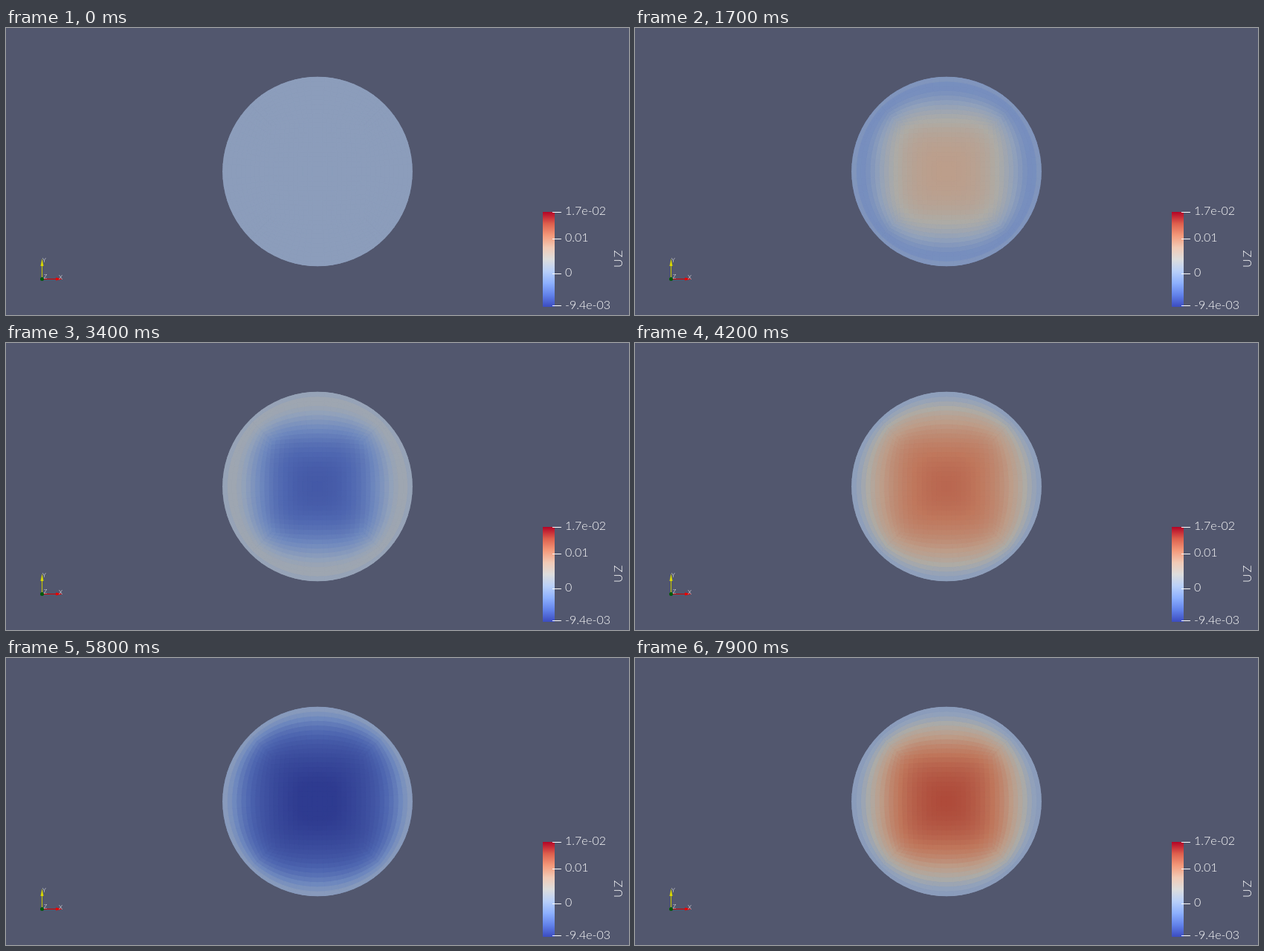
An HTML page with a canvas for the animation above (8 s loop, 838 by 387 pixels).

```html
<!DOCTYPE html>
<html lang="en">
<head>
<meta charset="utf-8">
<title>Vibrating plate</title>
<style>
  html, body { margin: 0; width: 100%; height: 100%; overflow: hidden; background: #52576e; }
  canvas, svg { position: absolute; left: 0; top: 0; width: 838px; height: 387px; }
  text { fill: #fff; font: 300 16px Lato, sans-serif; }
  .axis text { font-size: 8px; }
</style>
</head>
<body>
<canvas id="plate" width="838" height="387"></canvas>
<svg viewBox="0 0 838 387">
  <path d="M735 248.5h12M735 284.5h12M735 331.5h12M735 374.5h12" stroke="#fff"/>
  <text x="752" y="252">1.7e-02</text>
  <text x="752" y="288">0.01</text>
  <text x="752" y="335">0</text>
  <text x="752" y="379">-9.4e-03</text>
  <text transform="translate(829 323) rotate(-90)" letter-spacing="2">UZ</text>
  <g class="axis">
    <path d="M48.5 338V314" stroke="#c8c800"/>
    <path d="M46.5 321l2-10 2 10z" fill="#d8d800"/>
    <path d="M50 338.5H70" stroke="#d00000"/>
    <path d="M67 336.5l9 2-9 2z" fill="#e80000"/>
    <circle cx="48.5" cy="338.5" r="2.5" fill="#005a0a"/>
    <text x="49" y="316">Y</text>
    <text x="50.5" y="338">Z</text>
    <text x="71" y="339">X</text>
  </g>
</svg>
<script>
const ctx = document.getElementById('plate').getContext('2d');
const CX = 419, CY = 193.5, R = 127.8, CORE = 62, N = 20, RINGS = 10;
const LOOP = 8000, STEP = 100, ONSET = 200, RAMP = 400;
const PERIOD = 3415, PEAK = 1120;

// Colour scale from the lowest to the highest deflection (in 1e-4), and its shade on the plate
const LOW = -94, HIGH = 170;
const SCALE = ['#3b4cc0', '#6282ea', '#8db0fe', '#b9d0f9', '#dddddd', '#f1cab6', '#f49a7b', '#de604d', '#b40426'];
const SHADE = [.785, .775, .75];
const RGB = SCALE.map(hex => [1, 3, 5].map(i => parseInt(hex.slice(i, i + 2), 16)));

const clamp = x => Math.max(0, Math.min(1, x));

function tone(value) {
  const place = clamp((value - LOW) / (HIGH - LOW)) * (SCALE.length - 1);
  const i = Math.min(Math.floor(place), SCALE.length - 2), t = place - i;
  return `rgb(${SHADE.map((s, k) => Math.round(s * (RGB[i][k] * (1 - t) + RGB[i + 1][k] * t)))})`;
}

const phase = time => 2 * Math.PI * (time - PEAK) / PERIOD;

// A main mode plus a rim mode a quarter period ahead of it
const mainMode = r => 142 * (1 - r * r) * (1 - (r / .92) ** 8);
const rimMode = r => 210 * r ** 4 * (1 - r * r);

const corePoint = (u, v) => [
  CORE * u * (1 + .06 * (1 - v * v)),
  CORE * v * (1 + .06 * (1 - u * u))
];

function ringPoint(s, depth, side) {
  const [ix, iy] = corePoint(s, 1), angle = s * Math.PI / 4;
  let x = ix + (R * Math.sin(angle) - ix) * depth;
  let y = iy + (R * Math.cos(angle) - iy) * depth;
  for (let k = 0; k < side; k++) [x, y] = [y, -x];
  return [x, y];
}

function polygon(points) {
  const path = new Path2D();
  points.forEach(([x, y]) => path.lineTo(CX + x, CY + y));
  path.closePath();
  return path;
}

// The square mesh core bulges the contours towards its corners
function meshRadius(x, y) {
  const r = Math.hypot(x, y) / R, diagonal = Math.sin(2 * Math.atan2(y, x)) ** 2;
  return r * (1 - .5 * r * (1 - r) * diagonal);
}

const cells = [];
function addCells(cols, rows, point) {
  for (let i = 0; i < cols; i++) for (let j = 0; j < rows; j++) {
    const corners = [point(i, j), point(i + 1, j), point(i + 1, j + 1), point(i, j + 1)];
    const mean = k => corners.reduce((sum, c) => sum + c[k], 0) / 4;
    const r = meshRadius(mean(0), mean(1));
    cells.push({ path: polygon(corners), main: mainMode(r), rim: rimMode(r) });
  }
}
const unit = i => 2 * i / N - 1;
const outer = [];
addCells(N, N, (i, j) => corePoint(unit(i), unit(j)));
for (let side = 0; side < 4; side++) {
  addCells(N, RINGS, (i, j) => ringPoint(unit(i), j / RINGS, side));
  for (let i = 0; i < N; i++) outer.push(ringPoint(unit(i), 1, side));
}
// Sides advance the same way round as the points along each side
const outline = polygon(outer);

const legend = ctx.createLinearGradient(0, 376, 0, 248);
SCALE.forEach((color, i) => legend.addColorStop(i / (SCALE.length - 1), color));

function draw(time) {
  const t = clamp((time - ONSET) / RAMP), ramp = t * t * (3 - 2 * t);
  const main = ramp * Math.cos(phase(time)), rim = -ramp * Math.sin(phase(time));
  ctx.clearRect(0, 0, 838, 387);
  ctx.fillStyle = legend;
  ctx.fillRect(722, 248, 16, 128);
  ctx.save();
  ctx.clip(outline);
  for (const cell of cells) {
    ctx.fillStyle = ctx.strokeStyle = tone(cell.main * main + cell.rim * rim);
    ctx.fill(cell.path);
    ctx.stroke(cell.path);
  }
  ctx.restore();
}

const start = performance.now();
let shown = -1;
function tick() {
  let step = Math.floor((performance.now() - start) % LOOP / STEP);
  // The picture rests around each turning point
  while (Math.abs(Math.sin(phase(step * STEP))) < .2) step--;
  if (step !== shown) draw((shown = step) * STEP);
  requestAnimationFrame(tick);
}
tick();
</script>
</body>
</html>
```
